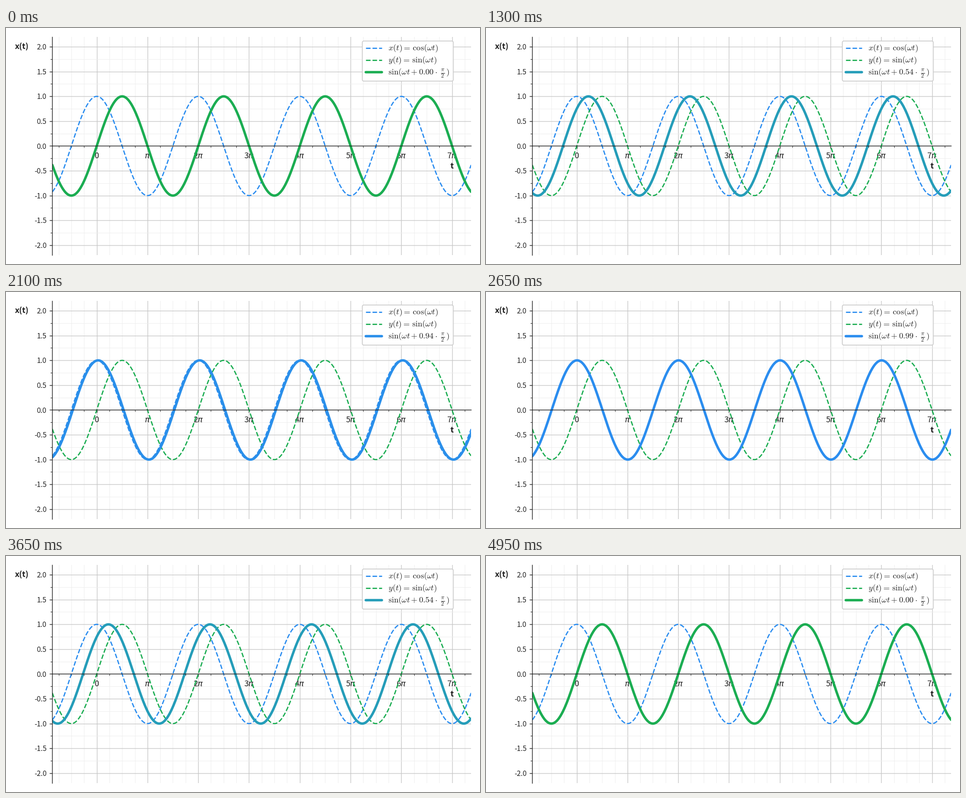
Recreate the animation shown at these times as a matplotlib script. Size 1058 px wide and 529 px high, loop 5 s.

```python
import numpy as np
import matplotlib.pyplot as plt
from matplotlib.animation import FuncAnimation
from matplotlib.colors import to_rgb
from matplotlib.lines import Line2D
from matplotlib.patches import FancyBboxPatch
from matplotlib.transforms import Affine2D

W, H, DPI = 1058, 529, 132.25
PX = 72 / DPI  # points per pixel
FRAMES, INTERVAL = 100, 50

LEFT, RIGHT, TOP, BOTTOM = 103.4, 1038.16, 19.8, 509.1  # axes box in pixels
T_MIN, T_MAX = -7 * np.pi / 8, 59 * np.pi / 8
Y_MAX = 2.2

BLUE, GREEN, INK = "#2b8df0", "#1bad52", "#222222"
THIN, THICK = 1.5, 3

plt.rcParams["font.family"] = ["Noto Sans CJK JP", "DejaVu Sans"]

fig = plt.figure(figsize=(W / DPI, H / DPI), dpi=DPI, facecolor="white")
ax = fig.add_axes([LEFT / W, 1 - BOTTOM / H, (RIGHT - LEFT) / W, (BOTTOM - TOP) / H])
pix = Affine2D().scale(1 / W, -1 / H).translate(0, 1) + fig.transFigure


def px_x(t):
    return LEFT + (t - T_MIN) / (T_MAX - T_MIN) * (RIGHT - LEFT)


def px_y(v):
    return TOP + (Y_MAX - v) / (2 * Y_MAX) * (BOTTOM - TOP)


def label(x, y, text, size, ha="center", zorder=1.6, **kw):
    """Text on a baseline given in pixels from the top left."""
    return ax.text(x, y, text, fontsize=size * PX, ha=ha, va="baseline",
                   color=INK, transform=pix, zorder=zorder, **kw)


def mix(a, b, p):
    """Blend two colours by their squared channels."""
    a, b = np.array(to_rgb(a)), np.array(to_rgb(b))
    return tuple(np.sqrt(a**2 * (1 - p) + b**2 * p))


# Axes, ticks and grid
ax.spines[["top", "right"]].set_visible(False)
ax.spines["bottom"].set_position("zero")
for side in ("left", "bottom"):
    ax.spines[side].set(color=INK, linewidth=0.8)

ax.set_xticks(np.arange(8) * np.pi)
ax.set_xticks(np.arange(-3, 30) * np.pi / 4, minor=True)
ax.set_yticks(np.arange(-4, 5) / 2)
ax.set_yticks(np.arange(-8, 9) / 4, minor=True)
ax.tick_params(which="both", color=INK, labelleft=False, labelbottom=False)
ax.tick_params(which="major", length=3.5, width=0.8)
ax.tick_params(which="minor", length=2, width=0.6)
ax.grid(which="major", color="#c8c8c8", linewidth=0.8)
ax.grid(which="minor", color="#eeeeee", linewidth=0.55)
ax.set_xlim(T_MIN, T_MAX)
ax.set_ylim(-Y_MAX, Y_MAX)

for k in range(8):
    text = "0" if k == 0 else (str(k) if k > 1 else "") + r"$\pi$"
    label(px_x(k * np.pi), 291.5, text, 18)
for v in np.arange(-4, 5) / 2:
    label(90.5, px_y(v) + 6.2, f"{v:.1f}", 16, ha="right")
label(px_x(7 * np.pi), 315.3, "t", 18, weight="bold")
label(35, 47, "x(t)", 18, weight="bold")

# Curves
t = np.linspace(T_MIN, T_MAX, 1000)
ax.plot(t, np.cos(t), "--", color=BLUE, lw=THIN)
ax.plot(t, np.sin(t), "--", color=GREEN, lw=THIN)
wave, = ax.plot(t, np.sin(t), color=GREEN, lw=THICK, solid_capstyle="round")

# Legend
ax.add_patch(FancyBboxPatch((795.3, 29.2), 203, 89.8, transform=pix, zorder=5,
                            boxstyle="round,pad=0,rounding_size=3.6",
                            fc="white", ec="#cccccc", lw=1))


def entry(y, color, text, **style):
    line = Line2D([802.6, 839.4], [y, y], color=color, transform=pix, zorder=6, **style)
    ax.add_artist(line)
    return line, label(853, y + 5.3, text, 18.37, ha="left", zorder=6,
                       math_fontfamily="cm")


entry(44.7, BLUE, r"$x(t) =\, \cos(\omega t)$", ls="--", lw=THIN)
entry(72, GREEN, r"$y(t) =\, \sin(\omega t)$", ls="--", lw=THIN)
key, formula = entry(99, GREEN, "", lw=THICK, solid_capstyle="round")


def update(i):
    p = (1 - np.cos(2 * np.pi * i / (FRAMES - 1))) / 2
    color = mix(GREEN, BLUE, p)
    wave.set_ydata(np.sin(t + p * np.pi / 2))
    wave.set_color(color)
    key.set_color(color)
    formula.set_text(rf"$\sin(\omega t + {p:.2f} \cdot\; \frac{{\pi}}{{2}}\,)$")
    return wave, key, formula


# Plain hyphens stand for minus signs in the labels above.
anim = FuncAnimation(fig, update, frames=FRAMES, interval=INTERVAL,
                     repeat=True, repeat_delay=0, blit=False)
plt.show()
```
